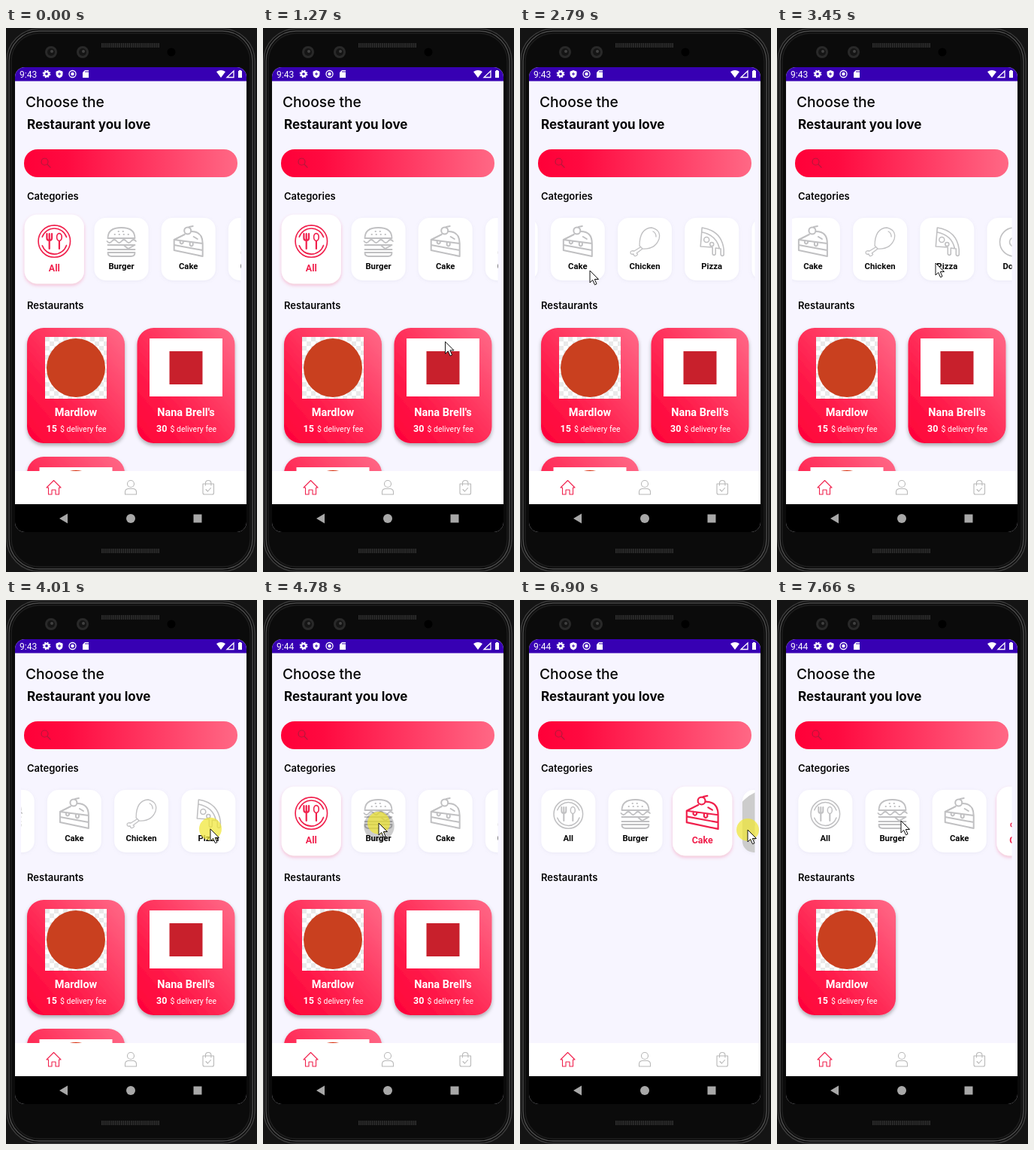
An HTML page that plays this animation: 334 by 722 pixels, repeating every 7.99 s.

```html
<!DOCTYPE html>
<html lang="en">
<head>
<meta charset="utf-8">
<title>Restaurant app</title>
<style>
html, body { margin: 0; width: 334px; height: 722px; overflow: hidden; background: #141414; }
svg { display: block; }
text { font-family: Roboto, sans-serif; }
.head { font-family: Inter, sans-serif; fill: #050505; }
.line { fill: none; stroke-linecap: round; stroke-linejoin: round; }
</style>
</head>
<body>
<svg id="stage" width="334" height="722" viewBox="0 0 334 722"></svg>
<script>
const LOOP = 7990, PITCH = 89.2, COAST = 600;
const RED = '#f0204c';
const $ = id => document.getElementById(id);

// Icons are centred on 0,0
const categories = [
  { name: 'All', stroke: 1.5, shows: [0, 1, 2],
    icon: `<circle r="19.3"/><circle r="15.500" stroke-dasharray="38 10.700" stroke-dashoffset="-5"/>
      <path stroke-width="2" d="M-9-9v5q0 3 3 3t3-3v-5M-6-9v18M6 0v9"/><ellipse cx="6" cy="-5" rx="3" ry="4.500"/>` },
  { name: 'Burger', stroke: 1.8, shows: [2],
    icon: `<path d="M-18-5q0-14 18-14t18 14zM-19-1${'q3.200 4 6.400 0t6.400 0'.repeat(3)}M-18 4h36l-9 5-6-5M-18 10h36M-18 14h36q0 5-5 5h-26q-5 0-5-5z"/>
      <path d="M-9-10H10M-4-14H8" stroke-dasharray=".5 5.500"/>` },
  { name: 'Cake', stroke: 2, shows: [],
    icon: `<path d="M-19-3L-5-10M4-14Q19-14 19 2L-19-3V11L19 19V2M-19 4L19 11M1-20l5-1M7-7l5 3M-11-2v3q2 3 4 0v-2M2 0v4q2 3 4 0v-3"/><circle cx="-1" cy="-15" r="4.500"/>` },
  { name: 'Chicken', stroke: 1.3, shows: [0],
    icon: `<path d="M-7 5Q-7-18 9-19Q22-16 19-4Q14 10-3 9ZM-6 7L-14 12Q-19 11-19 14T-15 16Q-14 20-11 18T-11 15L-3 9M11-14q4 2 4 7"/>` },
  { name: 'Pizza', stroke: 1.6, shows: [1],
    icon: `<path d="M-13-19Q13-15 16 10v7q-2 3-4 0v-8l-7-1v8q-2 3-4 0v-9l-16-1zM-13-13Q6-9 10 8"/><circle cx="-7" cy="-3" r="3.500"/><circle cy="3" r="2.500"/>` },
  { name: 'Donut', stroke: 1.6, shows: [], icon: '<circle r="19"/><circle r="6"/>' }
];

const categoryCard = ({ name, stroke, icon }, i) => `<g id="cat${i}">
  <rect id="base${i}" width="72" height="83" rx="15" fill="#fff"/>
  <g id="ink${i}" class="line" stroke-width="${stroke}" transform="translate(36 32)">${icon}</g>
  <text id="label${i}" x="36" y="68" text-anchor="middle" font-size="11.300" font-weight="700">${name}</text>
  <circle id="ripple${i}" cx="37" cy="48" clip-path="url(#cardClip)"/></g>`;

const photo = '<rect x="16.500" y="14" width="97" height="77" fill="#fff"/>';
const restaurants = [
  ['Mardlow', 15, '<rect x="24" y="12" width="82" height="82" fill="url(#checks)"/><circle cx="65" cy="53" r="39" fill="#c9401f"/>'],
  ["Nana Brell's", 30, photo + '<rect x="43" y="31" width="44" height="44" fill="#c8202c"/>'],
  ['Burger Vonk', 25, photo + '<circle cx="65" cy="52" r="34" fill="#d62300"/>']
];

const restaurantCard = ([name, fee, image], i) => `<g id="rest${i}">
  <rect width="130" height="153" rx="22" fill="url(#cardRed)" filter="url(#soft)"/>${image}
  <g fill="#fff"><text x="65" y="117" text-anchor="middle" font-size="14.500" font-weight="700">${name}</text>
  <text x="25.500" y="138" font-size="12.500" font-weight="700">${fee}</text>
  <text x="44" y="138" font-size="10.500">$ delivery fee</text></g></g>`;

const grille = y => `<path d="M127 ${y}H205" stroke="#303030" stroke-width="6" stroke-dasharray="1.600 1"/>`;
const lens = x => `<circle cx="${x}" cy="32" r="8" fill="#292929"/><circle cx="${x}" cy="32" r="5" fill="#151515"/><circle cx="${x + 1}" cy="31" r="2" fill="#404040"/>`;
const rim = (inset, color) => `<rect x="${inset}" y="${inset}" width="${332 - 2 * inset}" height="${722 - 2 * inset}" rx="${44 - inset}" fill="#0b0b0b" stroke="${color}" stroke-width="1.500"/>`;
const shadow = (id, dy, blur, color, opacity) => `<filter id="${id}" x="-20%" y="-20%" width="140%" height="140%">
  <feDropShadow dx="0" dy="${dy}" stdDeviation="${blur}" flood-color="${color}" flood-opacity="${opacity}"/></filter>`;
const clip = (id, x, y, w, h, r) => `<clipPath id="${id}"><rect x="${x}" y="${y}" width="${w}" height="${h}" rx="${r}"/></clipPath>`;

$('stage').innerHTML = `
<defs>
  <linearGradient id="barRed"><stop stop-color="#ff0038"/><stop offset=".2" stop-color="#ff0a40"/><stop offset="1" stop-color="#ff6885"/></linearGradient>
  <linearGradient id="cardRed" x1="0" y1="1" x2="1" y2="0"><stop stop-color="#ff0038"/><stop offset=".3" stop-color="#ff1747"/><stop offset="1" stop-color="#ff6a88"/></linearGradient>
  <pattern id="checks" width="12" height="12" patternUnits="userSpaceOnUse"><path d="M0 0h12v12H0z" fill="#fff"/><path d="M0 0h6v6H0zM6 6h6v6H6z" fill="#e9e9e9"/></pattern>
  ${shadow('soft', 3, 2.5, '#000', 0.3)}${shadow('faint', 1, 2, '#88a', 0.12)}${shadow('glow', 2, 2, RED, 0.25)}
  ${clip('screenClip', 12, 52, 308, 617, 13)}${clip('listClip', 20, 240, 292.5, 110, 0)}
  ${clip('gridClip', 12, 385, 308, 203, 0)}${clip('cardClip', 0, 0, 72, 83, 15)}
</defs>
${rim(1, '#3c3c3c')}${rim(4, '#4a4a4a')}${rim(7, '#1e1e1e')}
${lens(60)}${lens(102)}${grille(23)}${grille(694)}
<circle cx="220" cy="32" r="5.500"/>
<g clip-path="url(#screenClip)">
  <rect x="12" y="52" width="308" height="617" fill="#f7f5ff"/>
  <rect x="12" y="52" width="308" height="18.500" fill="#3700b3"/>
  <g fill="#fff">
    <text id="clock" x="18" y="66" font-size="12"></text>
    <g fill="none" stroke="#fff" stroke-width="1.300">
      <circle cx="54" cy="61" r="3" stroke-width="2.400"/><circle cx="54" cy="61" r="4.700" stroke-dasharray="2 1.700"/>
      <circle cx="88.500" cy="61" r="4.500"/><path d="M303 57v8.500h-9z"/>
    </g>
    <circle cx="88.500" cy="61" r="2.200"/>
    <path d="M71 56l4.500 1.800v3.200q0 4-4.500 5.500q-4.500-1.500-4.500-5.500v-3.200zM105 56h5v10h-8v-7zM280 58q6-4 12 0l-6 8zM309 57h1v-1h3v1h1v9h-5z"/>
    <path d="M71 59v4M69 61h4M105 58h5" stroke="#3700b3"/>
  </g>
  <text class="head" x="26" y="105" font-size="19.200" font-weight="500">Choose the</text>
  <text class="head" x="28" y="134" font-size="17" font-weight="700">Restaurant you love</text>
  <rect x="24" y="161" width="284" height="37" rx="18" fill="url(#barRed)"/>
  <g class="line" stroke="#b5163a" stroke-width="1.200"><circle cx="51.500" cy="177.500" r="4.500"/><path d="M55 181l4 4"/></g>
  <text class="head" x="28" y="228" font-size="13" font-weight="600">Categories</text>
  <text class="head" x="28" y="373" font-size="13" font-weight="600">Restaurants</text>
  <g clip-path="url(#listClip)">${categories.map(categoryCard).join('')}</g>
  <g clip-path="url(#gridClip)">${restaurants.map(restaurantCard).join('')}</g>
  <rect x="12" y="588" width="308" height="44" fill="#fff"/>
  <g class="line" stroke="#b8b8b8" stroke-width="1.100">
    <path stroke="${RED}" d="M54 610l9.500-9.500 9.500 9.500h-2.500v9h-4.500v-6h-5v6h-4.500v-9z"/>
    <circle cx="166" cy="605" r="4.500"/><path d="M158.500 619v-3q0-4 4-4.500h7q4 .5 4 4.500v3z"/>
    <path d="M262 605h14.500v12q0 2-2 2h-10.500q-2 0-2-2zM265.500 607v-3q0-3.500 3.700-3.500t3.700 3.500v3M266 612.500l2.500 2.500 4-4.500"/>
  </g>
  <rect x="12" y="632" width="308" height="37"/>
  <g fill="#a8a8a8"><path d="M71 651l11-6.500v13z"/><circle cx="166" cy="651" r="6"/><rect x="249.500" y="645.500" width="11" height="11"/></g>
</g>
<g id="pointer">
  <circle id="press" r="15" fill="#f0e635" opacity=".72"/>
  <path d="M0 0V16L3.700 12.500 6.500 18.800 9 17.700 6.300 11.500H11.500Z" fill="#fff" stroke="#111"/>
</g>`;

// Pointer glides: start, end, x, y
const START = [300, 532];
const glides = [
  [390, 530, 247, 456], [990, 1800, 231, 313], [2200, 2700, 93, 322],
  [2900, 3400, 211, 312], [3800, 4140, 301, 300], [4290, 4640, 154, 296],
  [5150, 5650, 250, 302], [6200, 6600, 303, 305], [7150, 7660, 165, 293]
];

// A touch with a drag scrolls the list; one without selects its card
const touches = [
  { from: 1860, until: 2560, card: 2, move: 2200, drag: 166 },
  { from: 3100, until: 3400, move: 3100, drag: 46 },
  { from: 3780, until: 4140, move: 3800, drag: -212 },
  { from: 4740, until: 4940, card: 1 },
  { from: 5860, until: 5990, card: 2 },
  { from: 6740, until: 6940, card: 3 }
];
const drags = touches.filter(touch => touch.drag);
const picks = [{ card: 0, until: -LOOP }, ...touches.filter(touch => !touch.drag)];

const clamp = v => Math.max(0, Math.min(1, v));
const smooth = v => { v = clamp(v); return v * v * (3 - 2 * v); };
const pickIndex = t => picks.findLastIndex(pick => pick.until <= t);

function pointerAt(t) {
  return glides.reduce(([x, y], [start, end, toX, toY]) => {
    const k = smooth((t - start) / (end - start));
    return [x + (toX - x) * k, y + (toY - y) * k];
  }, START);
}

function drawRipple(i, t) {
  const touch = touches.find(p => p.card === i && t >= p.from && t < p.until + 70);
  const release = touch && (touch.move || touch.until);
  $('ripple' + i).setAttribute('r', touch ? Math.min(49, 10 + (t - touch.from) / 4) : 0);
  $('ripple' + i).setAttribute('opacity', touch ? 0.2 * clamp(1 - (t - release) / 70) : 0);
}

function drawCategories(t) {
  const scroll = drags.reduce((sum, d) => sum + d.drag * smooth((t - d.move) / COAST), 0);
  const now = t - 60, index = pickIndex(now);
  const chosen = picks[index], previous = picks[index - 1];
  const grow = smooth((now - chosen.until) / 200);
  categories.forEach((_, i) => {
    const on = i === chosen.card;
    const lift = on ? grow : previous && i === previous.card ? 1 - grow : 0;
    $('cat' + i).setAttribute('transform',
      `translate(${64.3 + i * PITCH - scroll} 293.500) scale(${1 + lift / 10}) translate(-36 -41.500)`);
    $('base' + i).setAttribute('filter', `url(#${on ? 'glow' : 'faint'})`);
    $('ink' + i).setAttribute('stroke', on ? RED : '#c0c0c2');
    $('label' + i).setAttribute('fill', on ? RED : '#080808');
    drawRipple(i, t);
  });
}

function drawRestaurants(t) {
  const { shows } = categories[picks[pickIndex(t - 140)].card];
  restaurants.forEach((_, i) => {
    const slot = shows.indexOf(i);
    $('rest' + i).style.display = slot < 0 ? 'none' : '';
    $('rest' + i).setAttribute('transform',
      `translate(${28 + (slot % 2) * 146.5} ${398 + (slot >> 1) * 171})`);
  });
}

function frame() {
  const t = performance.now() % LOOP;
  $('clock').textContent = t < 4430 ? '9:43' : '9:44';
  drawCategories(t);
  drawRestaurants(t);
  $('pointer').style.display = t < glides[0][0] ? 'none' : '';
  $('pointer').setAttribute('transform', `translate(${pointerAt(t).join(' ')})`);
  $('press').style.display = touches.some(p => t >= p.from && t < p.until) ? '' : 'none';
  requestAnimationFrame(frame);
}
frame();
</script>
</body>
</html>
```
